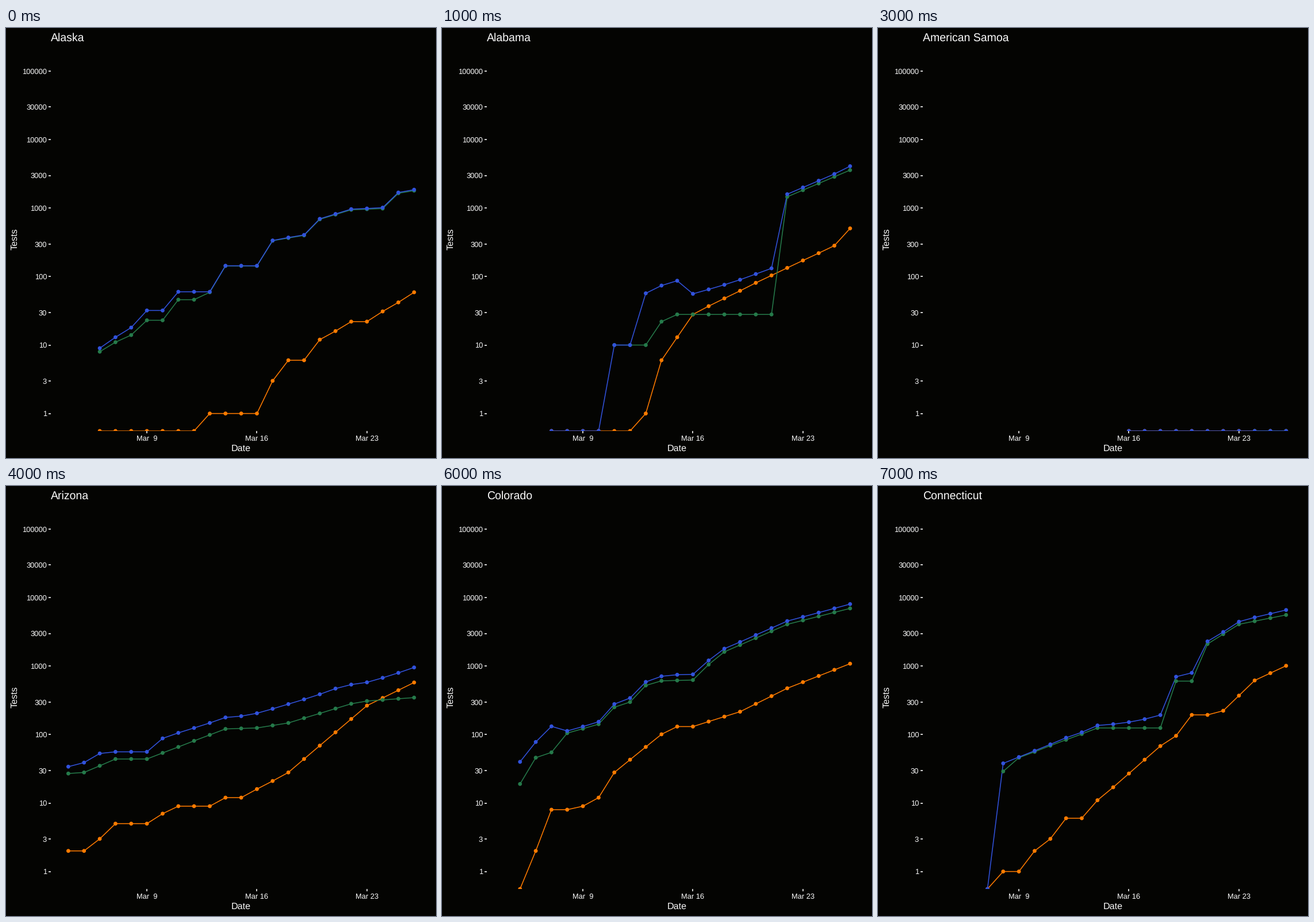
A matplotlib script for the animation above (8000 ms loop, 748x748 px).

```python
import matplotlib.pyplot as plt
import numpy as np
from matplotlib.animation import FuncAnimation

SIZE = 748
DPI = 64
PT = 72 / DPI                                # points per pixel
LEFT, RIGHT, TOP, BOTTOM = 78.2, 740, 31, 701
DAY9, DAY_W = 245.1, 27.34                   # x of Mar 9, pixels per day
ONE_Y, DECADE = 670.6, 119.08                # y of value 1, pixels per decade
LAST_DAY = 26
BG, FG = "#040402", "#fafafa"
ORANGE, GREEN, BLUE = COLORS = "#ff7b00", "#257a4a", "#3152dd"

plt.rcParams.update({"font.family": "Liberation Sans", "text.hinting": "none",
                     "path.snap": False})

# Per state: positive, negative and pending counts as {day: count} key points.
# Between two key points a count grows by a constant daily factor.
STATES = {
    "Alaska": (
        {6: 0, 12: 0, 13: 1, 16: 1, 17: 3, 18: 6, 19: 6, 20: 12, 22: 22,
         23: 22, 26: 59},
        {6: 8, 8: 14, 9: 23, 10: 23, 11: 46, 12: 46, 13: 59, 14: 143, 16: 143,
         17: 334, 19: 400, 20: 686, 22: 946, 24: 986, 25: 1649, 26: 1801},
        {6: 1, 9: 9, 10: 9, 11: 14, 12: 14}),
    "Alabama": (
        {7: 0, 12: 0, 13: 1, 14: 6, 16: 28, 20: 81, 25: 283, 26: 506},
        {11: 10, 13: 10, 14: 22, 15: 28, 21: 28, 22: 1464, 26: 3593},
        {13: 46, 15: 46}),
    "Arkansas": (
        {6: 0, 11: 0, 12: 6, 15: 16, 16: 22, 17: 22, 19: 46, 20: 96, 22: 165,
         26: 335},
        {6: 6, 8: 6, 9: 12, 11: 12, 12: 24, 13: 30, 14: 65, 17: 197, 20: 351,
         21: 567, 23: 906, 24: 947, 25: 1437, 26: 1504},
        {10: 3, 11: 14, 15: 30, 16: 14, 19: 113, 20: 203, 22: 119}),
    "American Samoa": ({16: 0, 26: 0}, {24: 0, 26: 0}, {}),
    "Arizona": (
        {4: 2, 5: 2, 7: 5, 9: 5, 11: 9, 13: 9, 14: 12, 15: 12, 18: 28,
         23: 265, 26: 577},
        {4: 27, 5: 28, 7: 44, 9: 44, 14: 121, 16: 125, 18: 148, 22: 282,
         23: 309, 26: 347},
        {4: 5, 6: 15, 7: 7, 9: 7, 10: 27, 15: 51, 18: 103, 21: 122, 22: 87,
         23: 6, 26: 33}),
    "California": (
        {4: 53, 5: 53, 7: 69, 9: 114, 12: 202, 13: 202, 16: 335, 19: 924,
         26: 3006},
        {4: 462, 8: 462, 9: 690, 10: 690, 11: 916, 15: 916, 16: 7981,
         18: 7981, 20: 10424, 22: 11304, 26: 17380},
        {23: 12100, 24: 12100, 25: 48600, 26: 57400}),
    "Colorado": (
        {5: 0, 6: 2, 7: 8, 9: 9, 10: 12, 11: 28, 14: 101, 15: 131, 16: 131,
         19: 216, 22: 475, 26: 1086},
        {5: 19, 6: 46, 7: 55, 8: 105, 10: 142, 11: 251, 12: 299, 13: 522,
         14: 610, 16: 627, 17: 1056, 18: 1617, 22: 4075, 26: 6976},
        {5: 21, 6: 30, 7: 69}),
    "Connecticut": (
        {7: 0, 8: 1, 9: 1, 11: 3, 12: 6, 13: 6, 14: 11, 18: 68, 19: 96,
         20: 194, 21: 194, 22: 223, 24: 618, 26: 1012},
        {8: 29, 9: 46, 14: 125, 18: 125, 19: 604, 20: 604, 21: 2106, 23: 4085,
         26: 5598},
        {8: 8}),
}


def day_at(x):
    return 9 + (x - DAY9) / DAY_W


def value_at(y):
    return 10 ** ((ONE_Y - y) / DECADE)


def counts(keys, days):
    """Whole counts on the given days, zero outside the key points."""
    if not keys:
        return np.zeros(len(days))
    logs = np.log(np.maximum(list(keys.values()), 0.1))
    values = np.round(np.exp(np.interp(days, list(keys), logs)))
    return np.where((days >= min(keys)) & (days <= max(keys)), values, 0)


def curves(parts):
    """Points of the positive, negative and total curves."""
    starts = min(parts[0]), min(parts[1]), min(parts[0])
    days = np.arange(starts[0], LAST_DAY + 1)
    pos, neg, pending = (counts(keys, days) for keys in parts)
    result = []
    for start, values in zip(starts, (pos, neg, pos + neg + pending)):
        # zeros sit on the lower edge of the log axis
        points = np.column_stack([days, np.maximum(values, value_at(BOTTOM))])
        result.append(points[days >= start])
    return result


fig = plt.figure(figsize=(SIZE / DPI, SIZE / DPI), dpi=DPI, facecolor=BG)
ax = fig.add_axes([LEFT / SIZE, 1 - BOTTOM / SIZE,
                   (RIGHT - LEFT) / SIZE, (BOTTOM - TOP) / SIZE])
ax.set_facecolor("none")
ax.set_yscale("log")
ax.set_xlim(day_at(LEFT), day_at(RIGHT))
ax.set_ylim(value_at(BOTTOM), value_at(TOP))
ax.spines[:].set_visible(False)


def label(x, y, text, size, **kw):
    return fig.text(x / SIZE, 1 - y / SIZE, text, color=FG,
                    fontsize=size * PT, va="baseline", **kw)


y_ticks = [m * 10 ** e for e in range(6) for m in (1, 3)][:-1]
x_ticks = range(9, 24, 7)
ax.set_yticks(y_ticks, [""] * len(y_ticks))
ax.set_xticks(x_ticks, [""] * len(x_ticks))
ax.minorticks_off()
ax.tick_params(length=4 * PT, width=1.6 * PT, color=FG)

for v in y_ticks:
    label(71, ONE_Y - DECADE * np.log10(v) + 4.8, str(v), 12.9, ha="right")
for d in x_ticks:
    label(DAY9 + (d - 9) * DAY_W, 718, f"Mar {d:2d}", 12.9, ha="center")
label(409, 736.3, "Date", 16.1, ha="center")
label(19.8, 367.5, "Tests", 16.1, ha="center", rotation=90,
      rotation_mode="anchor")
title = label(78, 22.3, "", 19.5, ha="left")

lines = [ax.plot([], [], color=c, lw=1.55 * PT)[0] for c in COLORS]
dots = ax.scatter([], [], s=(6.8 * PT) ** 2, linewidths=0, zorder=3)


def update(i):
    name, parts = list(STATES.items())[i]
    title.set_text(name)
    series = curves(parts)
    for line, points in zip(lines, series):
        line.set_data(*points.T)
    dots.set_offsets(np.vstack(series))
    dots.set_facecolor([c for c, pts in zip(COLORS, series) for _ in pts])
    return [title, dots, *lines]


anim = FuncAnimation(fig, update, frames=len(STATES), interval=1000,
                     repeat=True, repeat_delay=0)
plt.show()
```
